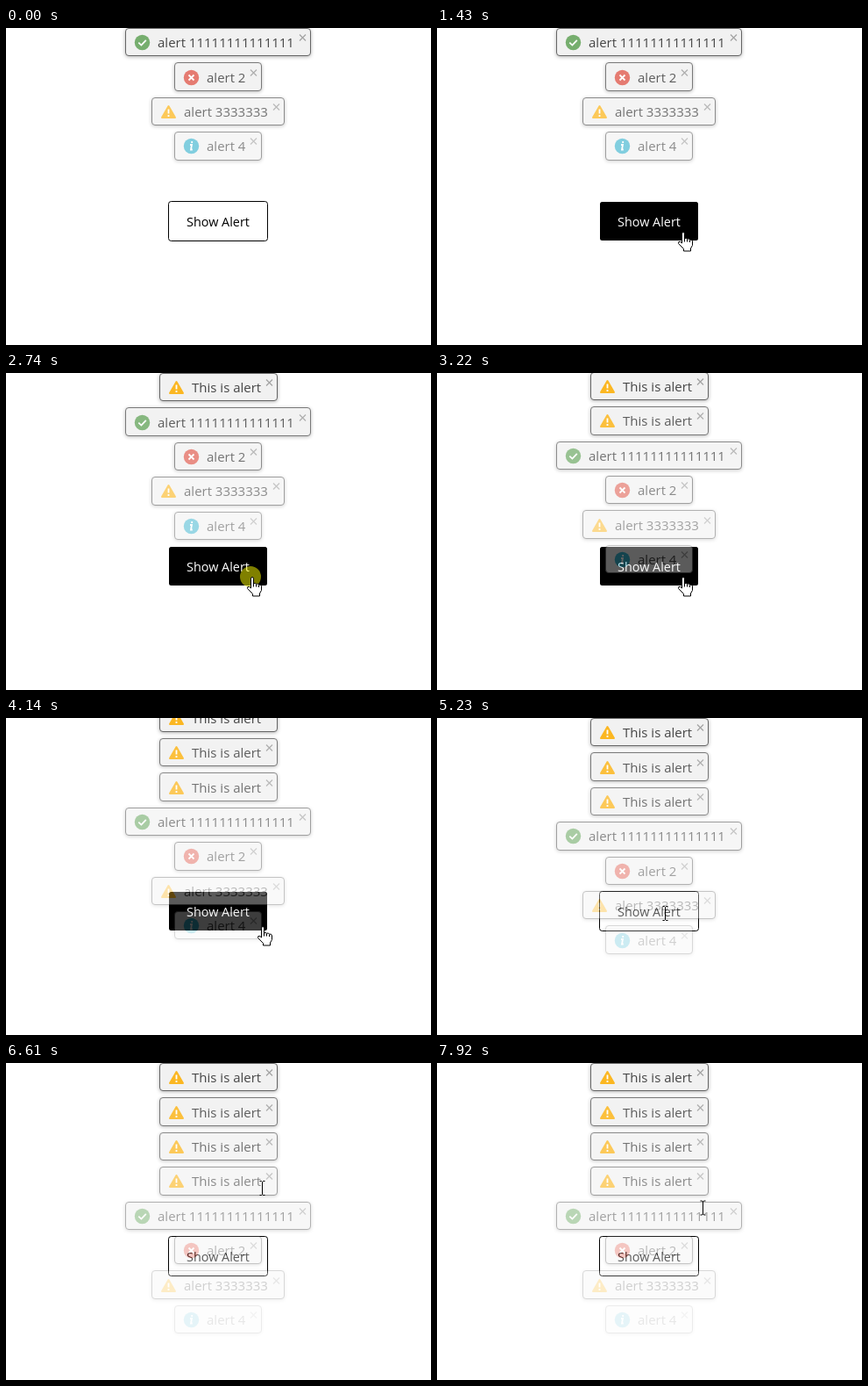
Write an HTML page that moves like this. It is 485 px wide and 361 px high and loops after 7.99 s.

```html
<!DOCTYPE html>
<html lang="en">
<head>
<meta charset="utf-8">
<title>Stacked alerts</title>
<style>
html, body { margin: 0; width: 100%; height: 100%; overflow: hidden; background: #fff; }
svg { display: block; }
text { font: 15px "Open Sans", "Noto Sans", sans-serif; fill: #464646; white-space: pre; }
#label { font-size: 14.4px; }
.box { fill: #f1f1f1; stroke: #666; filter: drop-shadow(0 1.5px 2px rgba(0, 0, 0, .3)); }
.close { stroke: #a4a4a4; stroke-width: 1.3; }
.mark { fill: none; stroke: #fff; stroke-width: 1.8; }
.pointer { fill: #fff; stroke: #000; stroke-linejoin: round; }
#ibeam { fill: none; stroke: #000; }
</style>
</head>
<body>
<svg width="485" height="361" viewBox="0 0 485 361">
  <rect x="185.5" y="197.5" width="113" height="45" rx="3" fill="#fff" stroke="#000" id="idle"/>
  <rect x="186" y="198" width="112" height="44" rx="2.5" id="hover"/>
  <text id="label" x="206" y="226">Show Alert</text>
  <g id="alerts"></g>
  <g id="cursor">
    <circle id="click" r="12" fill="#ff0" fill-opacity=".5"/>
    <path id="arrow" class="pointer" d="M.5 .5V16.5L4.2 13L6.7 18.7L9.2 17.6L6.7 12.2H11.8Z"/>
    <g id="hand" class="pointer">
      <path d="M.5 2.2Q.5 .5 2 .5Q3.5 .5 3.5 2.2V8Q5.2 6.6 6.5 8.3Q8.6 7.1 9.5 9.2Q12.2 8.3 12.5 11V15.5L10.5 19V22H2.5V19.5L-3.4 13.5Q-4 10.5 -1.2 11.4L.5 13Z"/>
      <path fill="none" d="M3.5 8V11.5M6.5 8.5V11.5M9.5 9.5V12"/>
    </g>
    <path id="ibeam" d="M-3 -8H-1L0 -7L1 -8H3M0 -7V7M-3 8H-1L0 7L1 8H3"/>
  </g>
</svg>
<script>
const LOOP = 7990, HEIGHT = 32.4, PITCH = HEIGHT + 7;
const SLIDE = 520, DELAY = 75, FADE = 120;
const $ = id => document.getElementById(id);
const show = (id, on) => $(id).style.display = on ? '' : 'none';
const ramp = (t, start, length) => Math.max(0, Math.min(1, (t - start) / length));

// CSS "ease" timing curve, solved by bisection
function ease(x) {
  if (x <= 0 || x >= 1) return x;
  let lo = 0, hi = 1, u;
  for (let i = 0; i < 20; i++) {
    u = (lo + hi) / 2;
    if (.75 * u * (1 - u) + u ** 3 < x) lo = u; else hi = u;
  }
  return .3 * u * (1 - u) ** 2 + 3 * u * u * (1 - u) + u ** 3;
}

const disc = (color, mark) =>
  `<circle cx="19.5" cy="16.5" r="8.7" fill="${color}"/><path class="mark" d="${mark}"/>`;
const icons = {
  success: disc('#76ae6e', 'M15.3 16.7L18.4 19.6L23.8 13.8'),
  error: disc('#e2695d', 'M16.5 13.5L22.5 19.5M22.5 13.5L16.5 19.5'),
  warning: '<path d="M19.5 10L27 23H12Z" fill="#fbb722" stroke="#fbb722" stroke-width="2" stroke-linejoin="round"/>' +
    '<path class="mark" d="M19.5 13.5V18.5M19.5 20V22"/>',
  info: disc('#36b1cc', 'M18 15H20L19 20.5H20.8M20.2 11V13')
};

// newest first: one alert per click, then those already there
const clicks = [1890, 2740, 3890, 5900];
const alerts = [
  ...clicks.map(() => ['This is alert', 135, 'warning']),
  ['alert 11111111111111', 212, 'success'],
  ['alert 2', 100, 'error'],
  ['alert 3333333', 152, 'warning'],
  ['alert 4', 100, 'info']
];

$('alerts').innerHTML = alerts.map(([label, w, icon]) => `<g>
  <rect class="box" x=".5" y=".5" width="${w - 1}" rx="3.5"/>
  <g>${icons[icon]}<text x="37" y="22">${label}</text>
  <path class="close" d="M${w - 13} 7.5l7 7m0 -7l-7 7"/></g></g>`).join('');
const nodes = [...$('alerts').children];

// cursor key points: time, x, y
const path = [
  [500, 478, 350], [1350, 279, 232], [3340, 279, 232], [3510, 291, 237], [4300, 291, 237],
  [4910, 262, 203.5], [5230, 260.5, 222.5], [5380, 264, 235], [5600, 264, 230], [6060, 264, 230],
  [6610, 292.5, 142.5], [7010, 308, 114], [7460, 310, 122], [7730, 292.5, 142], [7920, 303.5, 165]
];

function cursorAt(t) {
  const next = path.findIndex(p => p[0] > t);
  const b = path.at(next), a = path[next - 1] || b;
  const k = ramp(t, a[0], b[0] - a[0] || 1);
  return [1, 2].map(i => Math.round(2 * (a[i] + (b[i] - a[i]) * k)) / 2);
}

function drawAlerts(t) {
  const begun = clicks.filter(c => t > c + DELAY).length;
  const shift = clicks.reduce((sum, c) => sum + ease(ramp(t, c + DELAY, SLIDE)), 0);
  nodes.forEach((node, i) => {
    const slot = i - clicks.length;
    const y = (slot + shift) * PITCH, top = Math.round(y);
    const [box, content] = node.children;
    node.setAttribute('transform', `translate(${Math.floor(242.5 - alerts[i][1] / 2)} ${top})`);
    node.setAttribute('opacity', 1 - (slot + begun) / 8);
    node.style.display = slot + begun < 0 ? 'none' : '';
    box.setAttribute('height', Math.round(y + HEIGHT) - top - 1);
    content.setAttribute('transform', `translate(0 ${Math.round(y + .2) - top})`);
  });
}

function drawButton(t) {
  const pulse = (from, to) => ramp(t, from, FADE) - ramp(t, to, FADE);
  const hover = pulse(1310, 4340) + pulse(5570, 6200);
  const tone = 255 * hover;
  $('idle').setAttribute('stroke-opacity', 1 - hover);
  $('hover').setAttribute('opacity', hover);
  $('label').style.fill = `rgb(${tone}, ${tone}, ${tone})`;
  return hover > 0;
}

function drawCursor(t, hovering) {
  $('cursor').setAttribute('transform', `translate(${cursorAt(t).join(' ')})`);
  show('arrow', !hovering && t >= 500 && t < 1350);
  show('hand', hovering);
  show('ibeam', !hovering && t >= 4910);
  show('click', clicks.some(c => t >= c && t < c + 2 * DELAY));
}

const start = performance.now();
function tick() {
  const t = (performance.now() - start) % LOOP;
  drawAlerts(t);
  drawCursor(t, drawButton(t));
  requestAnimationFrame(tick);
}
tick();
</script>
</body>
</html>
```
